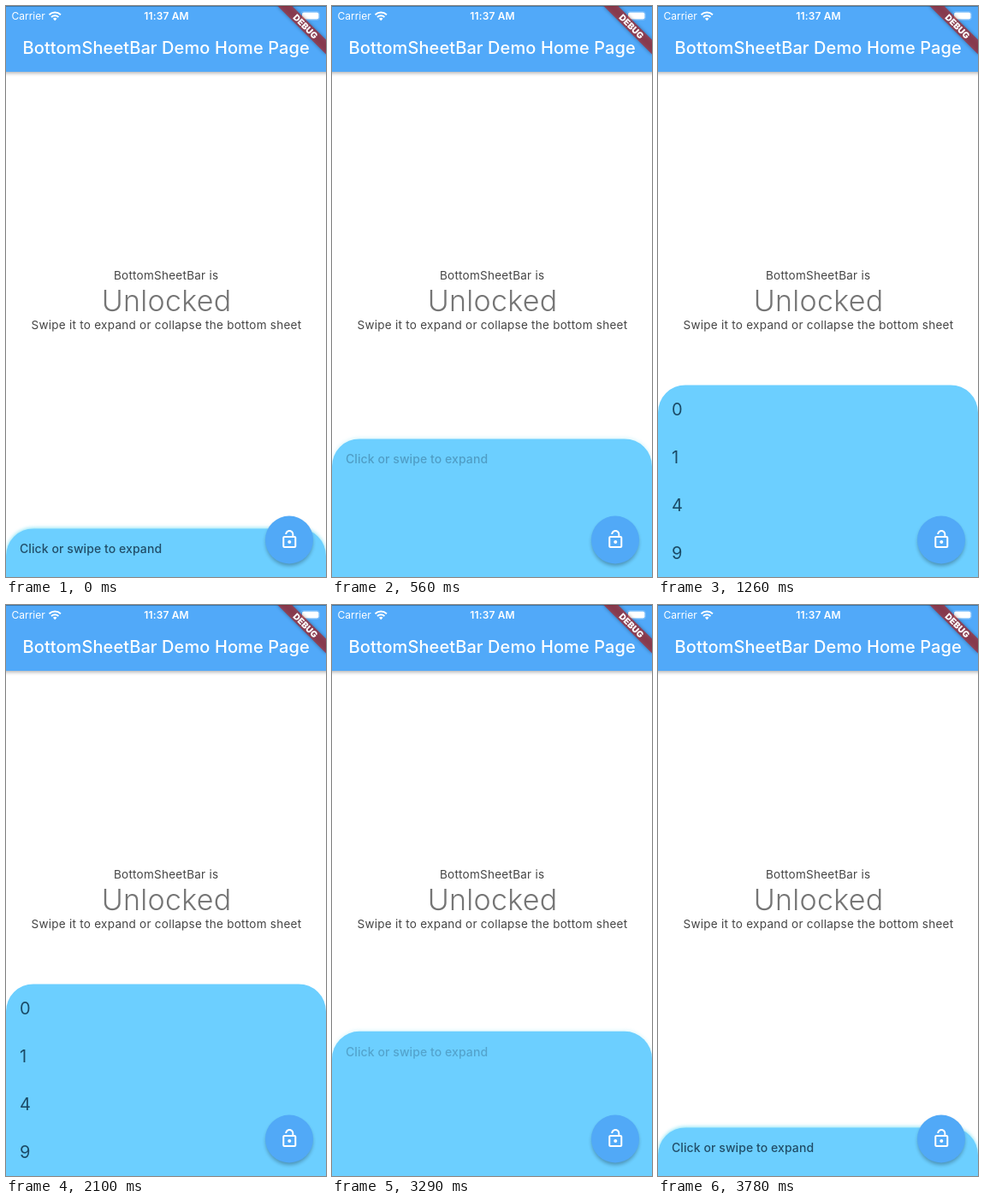
Animation, 374 px wide and 668 px high, one loop 3850 ms. Source, as an HTML page:

```html
<!DOCTYPE html>
<html lang="en">
<head>
<meta charset="utf-8">
<title>Bottom sheet demo</title>
<style>
  html, body { margin: 0; width: 100%; height: 100%; overflow: hidden; background: #fff; }
  svg { display: block; width: 374px; height: 668px; font-family: Inter, Roboto, sans-serif; }
  .white { fill: #fff; }
  .mid { text-anchor: middle; }
  .title { font-size: 20px; font-weight: 500; letter-spacing: .09px; }
  .body { font-size: 13.5px; letter-spacing: .26px; fill: #454545; }
  .state { font-size: 34px; font-weight: 300; letter-spacing: .3px; fill: #757575; }
  .hint { font-size: 14px; font-weight: 500; letter-spacing: .08px; fill: #214d68; }
</style>
</head>
<body>
<svg viewBox="0 0 374 668">
  <defs>
    <filter id="blur" x="-20%" y="-50%" width="140%" height="200%"><feGaussianBlur stdDeviation="2"/></filter>
  </defs>

  <rect width="374" height="668" class="white"/>
  <rect x="-6" y="6" width="386" height="72.5" opacity=".32" filter="url(#blur)"/>
  <rect width="374" height="77" fill="#51a9f9"/>
  <rect width="374" height="1" fill="#3878b0"/>
  <text x="19.5" y="56" class="title white">BottomSheetBar Demo Home Page</text>

  <g class="white">
    <text x="6.5" y="16" font-size="12">Carrier</text>
    <text x="187.5" y="16" font-size="12" font-weight="600" letter-spacing=".15" class="mid">11:37 AM</text>
    <g fill="none" stroke="#fff" stroke-width="2">
      <path d="M50.5 10.2a9.6 9.6 0 0 1 13.4 0"/>
      <path d="M53 13a6 6 0 0 1 8.4 0"/>
    </g>
    <path d="M57.2 17.2l-2.3-2.4a3.3 3.3 0 0 1 4.6 0z"/>
    <rect x="344.5" y="6.5" width="22" height="10" rx="3" fill="none" stroke="#fff" stroke-opacity=".2"/>
    <rect x="346" y="7.5" width="19.5" height="8" rx="2"/>
  </g>

  <text x="187.2" y="320" class="mid body">BottomSheetBar is</text>
  <text x="187.7" y="356.5" class="mid state">Unlocked</text>
  <text x="187.5" y="378" class="mid body">Swipe it to expand or collapse the bottom sheet</text>

  <g id="sheet">
    <rect id="glow" y="-1" width="374" height="250" rx="32" fill="#6cdcf2" filter="url(#blur)"/>
    <path d="M0 250V32A32 32 0 0 1 32 0H342A32 32 0 0 1 374 32V250z" fill="#6ccfff"/>
    <text id="hint" x="16" y="28.7" class="hint">Click or swipe to expand</text>
    <g id="list" font-size="20" fill="#1b4a66"></g>
  </g>

  <circle cx="331" cy="627.5" r="27.5" opacity=".28" filter="url(#blur)"/>
  <circle cx="331" cy="624.5" r="28" fill="#51a9f7"/>
  <path class="white" transform="translate(319.3 612)" d="M12 17c1.1 0 2-.9 2-2s-.9-2-2-2-2 .9-2 2 .9 2 2 2z
    m6-9h-1V6c0-2.76-2.24-5-5-5S7 3.24 7 6h1.9c0-1.71 1.39-3.1 3.1-3.1s3.1 1.39 3.1 3.1v2H6
    c-1.1 0-2 .9-2 2v10c0 1.1.9 2 2 2h12c1.1 0 2-.9 2-2V10c0-1.1-.9-2-2-2zm0 12H6V10h12z"/>

  <g transform="translate(374 0) rotate(45)">
    <rect x="-40" y="28" width="80" height="12" opacity=".35" filter="url(#blur)"/>
    <rect x="-40" y="28" width="80" height="12" fill="#b71c1c" fill-opacity=".627"/>
    <text y="37.7" class="mid white" font-size="10.2" font-weight="900">DEBUG</text>
  </g>
</svg>
<script>
const LOOP = 3850, TICK = 70;
const CLOSED_Y = 611.4, OPEN_Y = 443.4;
const byId = id => document.getElementById(id);
const [sheet, glow, hint, list] = ['sheet', 'glow', 'hint', 'list'].map(byId);

list.innerHTML = [0, 1, 2, 3]
  .map(i => `<text x="16" y="${36 + 56 * i}">${i * i}</text>`).join('');

// [time in ms, how far the sheet is open]
const steps = [
  [0, 0], [140, .01], [210, .03], [280, .08], [350, .15], [420, .26], [490, .42], [560, .625],
  [630, .86], [700, .965], [770, 1],
  [3080, 1], [3150, .98], [3220, .88], [3290, .67], [3360, .423], [3430, .2], [3500, .09],
  [3570, .03], [3640, .01], [3710, 0], [LOOP, 0]
];

function openness(time) {
  const next = steps.findIndex(step => step[0] > time);
  const [t0, v0] = steps[next - 1], [t1, v1] = steps[next];
  return v0 + (v1 - v0) * (time - t0) / (t1 - t0);
}

function draw(time) {
  const open = openness(Math.floor(time % LOOP / TICK) * TICK);
  const y = CLOSED_Y + (OPEN_Y - CLOSED_Y) * open;
  sheet.setAttribute('transform', `translate(0 ${y.toFixed(2)})`);
  glow.setAttribute('opacity', (1 - open) * .8);
  hint.setAttribute('opacity', 1 - open);
  list.setAttribute('opacity', Math.max(0, (open - .7) / .3));
}

const start = performance.now();
function frame() {
  draw(performance.now() - start);
  requestAnimationFrame(frame);
}
frame();
</script>
</body>
</html>
```
